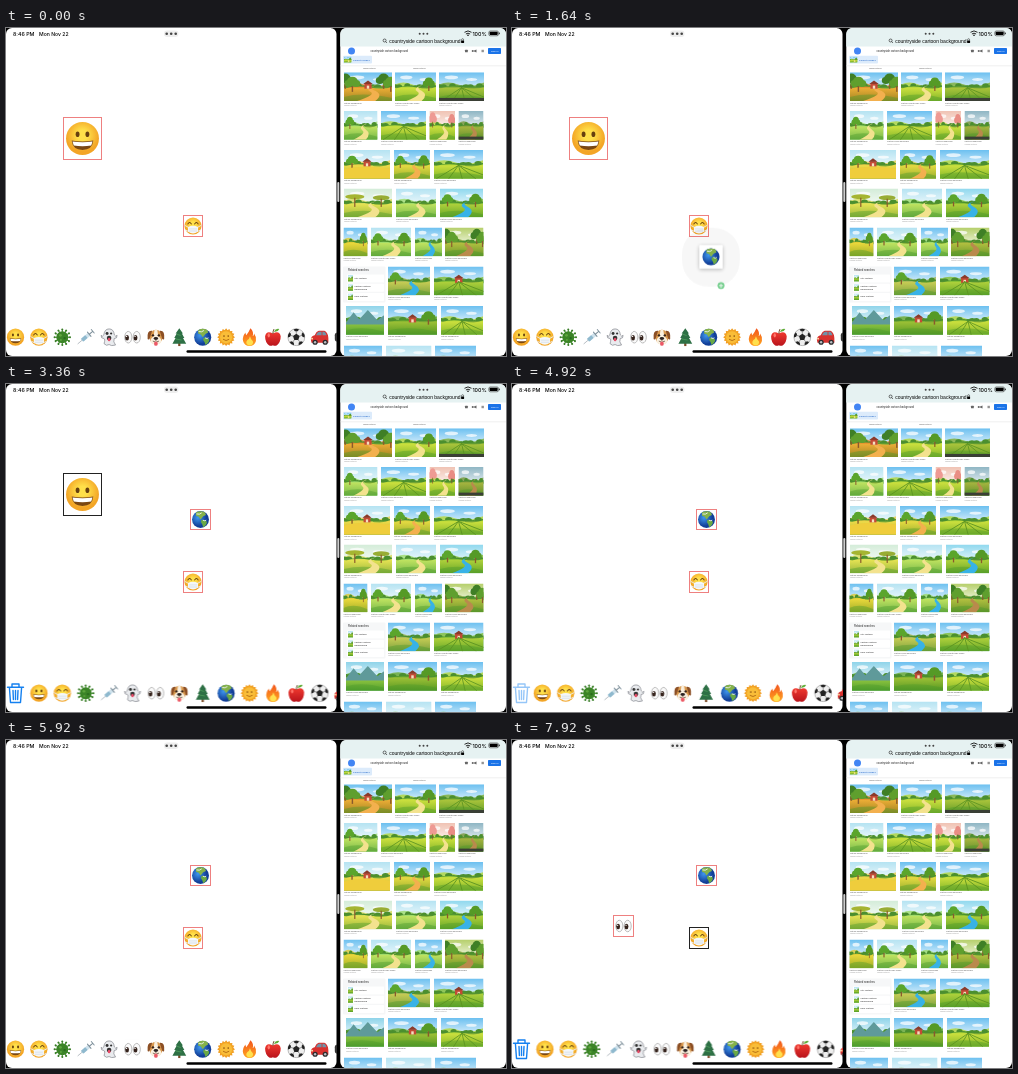
Write an HTML page that moves like this. It is 500x328 px and loops after 8 s.

```html
<!DOCTYPE html>
<html lang="en">
<head>
<meta charset="utf-8">
<title>Emoji board</title>
<style>
html, body { margin: 0; width: 100%; height: 100%; overflow: hidden; background: #000; }
svg { display: block; }
#stage { width: 100vw; height: 100vh; }
text { font-family: "Liberation Sans", sans-serif; }
.status { font-family: Inter, sans-serif; font-size: 5.3px; font-weight: 500; }
.card { filter: drop-shadow(0 1px 2px #0004); }
</style>
</head>
<body>
<svg id="stage" viewBox="0 0 500 328">
  <defs>
    <radialGradient id="gold" cy=".4"><stop offset=".3" stop-color="#ffe04a"/><stop offset="1" stop-color="#f3a526"/></radialGradient>
    <radialGradient id="sea" cx=".35" cy=".4"><stop offset="0" stop-color="#3f97ee"/><stop offset="1" stop-color="#123f98"/></radialGradient>
    <linearGradient id="flame" x2="0" y2="1"><stop offset="0" stop-color="#f2541d"/><stop offset="1" stop-color="#ffa51f"/></linearGradient>
    <linearGradient id="skin" x2="0" y2="1"><stop offset="0" stop-color="#f0392f"/><stop offset="1" stop-color="#b9141c"/></linearGradient>
    <linearGradient id="haze" x2="0" y2="1"><stop offset="0" stop-color="#fff" stop-opacity="0"/><stop offset="1" stop-color="#fff" stop-opacity=".65"/></linearGradient>
    <linearGradient id="shade" x2="0" y2="1"><stop offset="0" stop-color="#fff04a" stop-opacity=".35"/><stop offset="1" stop-color="#2c7a12" stop-opacity=".4"/></linearGradient>
    <clipPath id="leftClip"><rect width="330.5" height="328" rx="6"/></clipPath>
    <clipPath id="rightClip"><rect x="334.3" width="165.7" height="328" rx="6"/></clipPath>
  </defs>
  <g clip-path="url(#leftClip)">
    <rect width="331" height="328" fill="#fff"/>
    <text class="status" x="7" y="7.5">8:46 PM</text>
    <text class="status" x="33" y="7.5" style="font-size:5.1px">Mon Nov 22</text>
    <rect x="158" y="2.5" width="14.5" height="6.5" rx="3.2" fill="#eee"/>
    <g id="leftDots" fill="#444"></g>
    <g id="board"></g>
    <g id="trash" fill="none" stroke="#1480f0" stroke-width="1.4" stroke-linecap="round" stroke-linejoin="round">
      <path d="M1.5 303.2H17.5M6 303V300H13V303M3.4 303.5L4.5 318.5H14.5L15.6 303.5M7 306.5L7.4 315.5M9.5 306.5V315.5M12 306.5L11.6 315.5"/>
    </g>
    <g id="tray"></g>
    <rect x="180.5" y="322.3" width="140" height="2.5" rx="1.2"/>
    <g id="drags"></g>
  </g>
  <rect x="331.3" y="154" width="2" height="20" rx="1" fill="#ccc"/>
  <g clip-path="url(#rightClip)">
    <rect x="334" width="166" height="328" fill="#fff"/>
    <rect x="334" width="166" height="18.5" fill="#e6f2f2"/>
    <g id="rightDots" fill="#444"></g>
    <g fill="none" stroke="#111" stroke-width=".9">
      <path d="M458.5 4.3Q462 1.5 465.5 4.3M459.9 6Q462 4.3 464.1 6"/>
      <circle cx="378.6" cy="12.5" r="1.5" stroke-width=".6"/><path d="M379.7 13.6L381 15" stroke-width=".6"/>
      <path d="M455.6 12.7V11.7A1 1 0 0 1 457.6 11.7V12.7" stroke-width=".5"/>
      <rect x="482.8" y="3" width="9.7" height="4.8" rx="1.5" stroke-width=".5"/>
    </g>
    <circle cx="462" cy="7.3" r=".8"/>
    <rect x="483.6" y="3.8" width="8.1" height="3.2" rx=".8"/><rect x="493" y="4.6" width=".7" height="1.6"/>
    <rect x="455.1" y="12.6" width="3" height="2.4" rx=".4"/>
    <text class="status" x="466.4" y="7.5">100%</text>
    <text x="383.3" y="14.8" font-size="5">countryside cartoon background</text>
    <circle cx="345.5" cy="23" r="3.5" fill="#4285f4"/>
    <text x="364.5" y="24" font-size="2.65" fill="#222">countryside cartoon background</text>
    <g fill="#666"><rect x="459" y="21.8" width="2.8" height="2.4" rx=".5"/><circle cx="466.7" cy="23" r="1"/><path d="M467 23L470.5 21.5V24.5Z"/><rect x="475.5" y="21.8" width="2.4" height="2.4" opacity=".7"/></g>
    <rect x="482" y="20" width="13" height="6" rx=".8" fill="#1a73e8"/>
    <text x="488.5" y="23.9" font-size="2.5" fill="#fff" text-anchor="middle">Sign in</text>
    <rect x="337" y="27.8" width="29" height="7.6" rx="1" fill="#dcebfb"/>
    <text x="347" y="32.5" font-size="2.5" fill="#1a62c8">Perfect image?</text>
    <path d="M334 37.8H500" stroke="#e4e4e4" stroke-width=".6"/>
    <g id="results"></g>
  </g>
</svg>
<script>
const LOOP = 8000, STEP = 23.4, TRAY_Y = 309.2;
const RED = '#ee8080', BLACK = '#222';
const $ = id => document.getElementById(id);
const add = (id, markup) => $(id).insertAdjacentHTML('beforeend', markup);
const circle = (x, y, r, fill) => `<circle cx="${x}" cy="${y}" r="${r}" fill="${fill}"/>`;
const oval = (x, y, rx, ry, fill) => `<ellipse cx="${x}" cy="${y}" rx="${rx}" ry="${ry}" fill="${fill}"/>`;
const rect = (x, y, w, h, fill, rx = 0) => `<rect x="${x}" y="${y}" width="${w}" height="${h}" rx="${rx}" fill="${fill}"/>`;
const shape = (d, fill) => `<path d="${d}" fill="${fill}"/>`;
const line = (d, stroke, width = 1) => `<path d="${d}" fill="none" stroke="${stroke}" stroke-width="${width}" stroke-linecap="round"/>`;
const mirror = draw => [-1, 1].map(draw).join('');
const spokes = (n, draw) => Array.from({ length: n }, (_, i) => `<g transform="rotate(${i * 360 / n})">${draw}</g>`).join('');

// Emoji, drawn in a 20 x 20 box around the origin
const face = circle(0, 0, 9.4, 'url(#gold)');
const EMOJI = {
  smile: face + mirror(s => oval(s * 2.8, -2.4, 1.1, 1.6, '#67400f')) +
    shape('M-6.2 1.2Q0 2.2 6.2 1.2Q5.6 6.6 0 6.6Q-5.6 6.6 -6.2 1.2Z', '#7a4712') +
    shape('M-5.7 1.7Q0 2.6 5.7 1.7L5 4Q0 4.9 -5 4Z', '#fff'),
  mask: face + mirror(s => line(`M${s * 5.7} -2.3Q${s * 3.7} -5.5 ${s * 1.8} -2.3`, '#67400f', 1.1) +
    line(`M${s * 5} 1.5L${s * 8.7} -.5M${s * 5} 6L${s * 8} 4.5`, '#e8edf2')) +
    shape('M-5.5 1Q0 -1.5 5.5 1V6Q0 10.5 -5.5 6Z', '#f4f7fa') + line('M-4 3.2H4M-4 5.5H4', '#c6d1da', .6),
  virus: spokes(12, line('M0 -5V-8.3', '#3f8b2b', 1.1) + circle(0, -8.4, 1.1, '#397d27')) +
    circle(0, 0, 6.5, '#3b8427') + circle(-2, -2, 1.5, '#5ea63e') + circle(2.5, 1, 1.3, '#286a1d') + circle(-1.5, 3, 1, '#5ea63e'),
  syringe: `<g transform="rotate(50)">${line('M0 5V11', '#87939c', .6) + rect(-2, -5, 4, 10.5, '#cfe2ec', .8) +
    rect(-2, -1, 4, 6, '#8fb9ce', .6) + line('M0 -5V-10M-2.5 -10H2.5M-3 -5H3', '#7e909b', 1.1)}</g>`,
  ghost: `<g stroke="#777b82" stroke-width=".7">${shape('M-5.5 7Q-4 2 -5.5 1.5Q-9 1.5 -8.7 -2Q-7 0 -5.7 -2.5Q-5 -9 0 -9T5.7 -2.5Q7 0 8.7 -2Q9 1.5 5.5 1.5Q4 5 7 8.5Q2 10 0 8Q-3 10 -5.5 7Z', '#e9ebee')}</g>` +
    circle(-2.2, -4, 1.6, '#333') + circle(2.2, -4, 1.2, '#333') + oval(0, 1, 2.5, 2.7, '#333') + oval(0, 2.5, 1.5, 2, '#e74c68'),
  eyes: mirror(s => `<g stroke="#999" stroke-width=".7">${oval(s * 4.6, 0, 3.9, 6.3, '#fafafa')}</g>` +
    oval(s * 4.6 - 1.3, .5, 2.1, 3, '#35231c') + circle(s * 4.6 - 1.8, -.8, .7, '#fff')),
  dog: oval(0, 0, 7, 8, '#d9994e') + mirror(s => shape(`M${s * 4} -7Q${s * 10} -8 ${s * 9} 2Q${s * 7} 4 ${s * 6} -1Z`, '#8c4f24')) +
    shape('M-1.5 -8H1.5L2.5 -1Q7 2 5.5 6Q0 10 -5.5 6Q-7 2 -2.5 -1Z', '#faf0df') + oval(0, 7, 2, 2.4, '#ec5866') +
    mirror(s => circle(s * 3.2, -2, 1.3, '#352319')) + oval(0, 1.5, 2.4, 1.6, '#2b2220') + line('M-3 4.5Q-1 6 0 3.5Q1 6 3 4.5', '#49301f', .7),
  tree: rect(-1.2, 6, 2.4, 3.7, '#7a4a26') + shape('M0 -9.7L4 -4H2.8L5.5 1H4L7.5 7H-7.5L-4 1H-5.5L-2.8 -4H-4Z', '#2e7045') +
    line('M-2 -3L1 -2M-3.5 2L2 3', '#53a45e', .8),
  globe: circle(0, 0, 9.3, 'url(#sea)') + shape('M-5 -7.6Q0 -10.4 5 -7.8L6 -5 3 -3.5 1 -1 0 0 -2 -3 -5 -4Z', '#85b24a') +
    shape('M1 .5Q4 -.5 7 2.5Q7.5 4 5.5 6.5L3 8.5Q2.5 5 .5 3Z', '#6aa945') + line('M-4 -6Q-1 -5 1 -7M3 1Q5 2 6 1', '#eef4f5', 1),
  sun: spokes(16, shape('M-2 -7L0 -9.7 2 -7Z', '#ef9a1f')) + circle(0, 0, 8, '#f3a425') + circle(0, 0, 6.5, '#f9bd38') +
    mirror(s => circle(s * 2.3, -1.2, .9, '#8a510e')) + line('M-3 2.5Q0 5 3 2.5', '#a9610f', .9),
  fire: shape('M1 -9.7Q-1 -5 -3.5 -2Q-4.5 -4 -4.3 -5Q-8 -1 -7 4Q-5.5 9.5 0 9.5T7 4Q8 0 5 -4Q5 -1.5 3.5 -1Q5 -6 1 -9.7Z', 'url(#flame)') +
    shape('M.5 -1Q0 2 -2.3 3Q-4.5 5.5 -2.5 8Q0 10 3 8Q5 5 2.5 3Q1.5 2 .5 -1Z', '#ffe04e'),
  apple: shape('M0 -4Q7 -8 8.5 -1Q8.5 6 4 9Q2 9.8 0 8.8Q-2 9.8 -4 9Q-8.5 6 -8.5 -1Q-7 -8 0 -4Z', 'url(#skin)') +
    line('M0 -4Q0 -7 1 -8.5', '#63401f', 1) + shape('M1 -6Q3 -10 7 -9Q5 -5 1 -6Z', '#5eac36') + oval(-4.5, -2, 1.3, 2.2, '#ff756a'),
  ball: `<g stroke="#888" stroke-width=".6">${circle(0, 0, 9.2, '#eee')}</g>` + shape('M0 -3.8L3.6 -1.2 2.2 3H-2.2L-3.6 -1.2Z', '#222') +
    spokes(5, line('M0 -4V-7', '#555', .6) + shape('M-3 -8.5Q0 -10 3 -8.5L1.5 -6.5H-1.5Z', '#222')),
  car: shape('M-9.7 2Q-9 -1.5 -5.5 -2.2Q-3.5 -6.5 -1 -7H5Q7.5 -6.5 9 -2Q9.8 1 9.5 6H-9Z', '#d8322f') +
    shape('M-4 -2.2Q-2.5 -5.6 -.8 -5.8H2V-2Z', '#6f93a8') + shape('M3 -5.8H5Q6.6 -5 7.4 -2H3Z', '#6f93a8') +
    [-5, 6].map(x => circle(x, 5.5, 2.8, '#2b2b2d') + circle(x, 5.5, 1.3, '#b9bdc2')).join('') + circle(-8.3, 1.6, 1, '#ffeab0'),
  taxi: rect(-9, -5, 18, 10, '#333', 3)
};
for (const [name, art] of Object.entries(EMOJI))
  document.querySelector('defs').insertAdjacentHTML('beforeend', `<symbol id="${name}" viewBox="-10 -10 20 20">${art}</symbol>`);
const emoji = (name, x, y, size) => `<use href="#${name}" x="${x - size / 2}" y="${y - size / 2}" width="${size}" height="${size}"/>`;

// Left side: tray and placed items
add('leftDots', [160.7, 165.2, 169.7].map(x => circle(x, 5.7, 1.3)).join(''));
add('rightDots', [413.7, 417.5, 421.3].map(x => circle(x, 5.7, 1)).join(''));
Object.keys(EMOJI).forEach((name, i) => add('tray', emoji(name, 9.5 + i * STEP, TRAY_Y, 18.4)));

function place(name, x, y, w, h, size) {
  add('board', `<g id="${name}Item"><rect id="${name}Box" x="${x}" y="${y}" width="${w}" height="${h}" fill="none" stroke="${RED}"/>
    ${emoji(name, x + w / 2, y + h / 2, size)}</g>`);
}
place('smile', 57.5, 89.5, 38, 42, 35);
place('mask', 177.5, 187.5, 19, 21, 18.2);
place('globe', 184.5, 125.5, 20, 20, 18.2);
place('eyes', 101.5, 175.5, 20, 21, 18.2);

// Right side: image results
const road = color => shape('M25 13Q17 16 22 19T11 28H26Q33 22 26 18T27 13Z', color);
const tree = (x, y, r, color) => rect(x - .6, y, 1.2, r * 1.8, '#8a5a2c') + circle(x - r * .7, y, r * .75, color) +
  circle(x + r * .7, y, r * .75, color) + circle(x, y - r * .5, r, color);
const PARTS = {
  m: shape('M0 16L8 6 14 13 23 4 33 14 40 9V18H0Z', '#5f9a9a'),
  y: shape('M0 19Q14 14 40 18V28H0Z', '#efcd3c'),
  f: line('M20 15L2 28M20 15L12 28M20 15L23 28M20 15L34 28M20 15L46 27', '#5c9422', .8),
  p: road('#f3e28e'), o: road('#f3b04e'), r: road('#38b2e6'), b: road('#b98a4c'),
  F: [1, 7, 33, 39].map((x, i) => tree(x, 8 + i % 2 * 3, 4.5, i % 2 ? '#5f9f2e' : '#3f7f26')).join(''),
  t: tree(7, 11, 3.6, '#5aa52c'), T: tree(33, 11, 4, '#559a26'),
  a: oval(9, 8, 8, 2.5, '#a5b531') + rect(8.5, 9, 1, 9, '#8a5a2c') + oval(31, 9, 7, 2.5, '#98ad34') + rect(30.5, 10, 1, 8, '#8a5a2c'),
  k: tree(5, 8, 4.5, '#ee9a93') + tree(35, 9, 4, '#e98d84'),
  h: rect(17, 11, 6, 5, '#c44a35') + shape('M16 11.5L20 8 24 11.5Z', '#8b3a2a') + rect(19, 13, 2, 3, '#f4dfc0'),
  d: rect(0, 25, 40, 3, '#3a3f35')
};
const bushes = Array.from({ length: 11 }, (_, i) => oval(i * 4, 13.5 + i % 3, 3, 1.8 + i % 2, '#4b8f2f')).join('');
const scene = (x, y, w, h, sky, grass, parts) => `<svg x="${x}" y="${y}" width="${w}" height="${h}" viewBox="0 0 40 28" preserveAspectRatio="none">
  ${rect(0, 0, 40, 28, sky)}${rect(0, 0, 40, 14, 'url(#haze)')}${oval(11, 5, 6, 1.8, '#fffb')}${oval(29, 7, 5, 1.5, '#fffb')}
  <g opacity=".8">${shape('M0 12Q8 8 17 12T40 10V28H0Z', grass)}</g>${bushes}${shape('M0 16Q10 12.5 22 15T40 14V28H0Z', grass)}
  ${rect(0, 15, 40, 13, 'url(#shade)')}${shape('M0 24Q16 19 40 25V28H0Z', '#4b982c66')}${[...parts].map(p => PARTS[p]).join('')}</svg>`;

const BLUE = '#6cc0f0', PALE = '#b5e3f2', LIME = '#b2d838', GREEN = '#84c034', MINT = '#9edc6c';
const ROWS = [
  [44.3, [338, 48, BLUE, '#e58a2c', 'Foh'], [389, 41, BLUE, LIME, 'pT'], [433, 45, BLUE, '#7fae34', 'fd']],
  [83, [338, 33.5, PALE, MINT, 'tp'], [375, 45, BLUE, LIME, 'f'], [423.5, 25.5, '#f0c3b4', LIME, 'kp'], [452.5, 25, '#8fb6c4', '#78963a', 'bd']],
  [122, [338, 46, PALE, '#e8cf48', 'thy'], [388, 36, BLUE, '#d8cf3e', 'tTo'], [428, 49, BLUE, LIME, 'f']],
  [160.5, [338, 48, '#d3ecd8', '#d8dc58', 'ap'], [390, 40, PALE, MINT, 'p'], [434, 43, '#8fd8ee', GREEN, 'trT']],
  [199.5, [337.5, 24, BLUE, '#e0cc34', 'T'], [365, 40, PALE, MINT, 'ptT'], [409, 27, BLUE, MINT, 'r'], [439, 38.5, '#b5cf6a', '#8aa63a', 'Fb']],
  [238.5, [382, 42, BLUE, '#a9b95a', 'tr'], [428, 49.5, BLUE, GREEN, 'hf']],
  [278, [340, 38, '#8fd4ea', '#62b53e', 'm'], [382, 49, BLUE, '#6aa82c', 'hT'], [435, 42, BLUE, LIME, 'f']],
  [317.5, [338, 38, BLUE, GREEN, ''], [380, 45.5, PALE, GREEN, ''], [429, 41, BLUE, GREEN, '']]
];
const label = (x, y, text, size = 2.05, fill = '#555') => `<text x="${x}" y="${y}" font-size="${size}" fill="${fill}">${text}</text>`;
const TITLES = ['Cartoon countryside scene', 'Cartoon rural landscape', 'Nature background'];
for (const [y, ...images] of ROWS) {
  images.forEach(([x, w, ...look], i) => {
    add('results', scene(x, y, w, 28.7, ...look) +
      label(x, y + 31.2, w < 30 ? 'Cartoon landscape' : TITLES[Math.floor(i + x) % 3]) + label(x, y + 33.7, 'sample pictures', 1.8, '#999'));
  });
}
add('results', label(357, 40.8, 'sample pictures', 1.8) + label(407, 40.8, 'sample pictures', 1.8) +
  scene(338, 28.6, 7.5, 6, BLUE, LIME, 'Tp') + rect(337, 238.5, 42.5, 36, '#f6f7f8', 1) + label(342, 243.3, 'Related searches', 2.7, '#222') +
  [['city cartoon'], ['cartoon natural', 'background'], ['farm cartoon']].map((lines, i) => {
    const y = 247 + i * 9.2;
    return rect(341, y - .5, 37, 8, '#fff', .6) + scene(342, y, 5, 6.5, PALE, GREEN, 'T') +
      lines.map((text, n) => label(348.5, y + 4 - (lines.length - 1) * 1.3 + n * 2.7, text, 2.4, '#222')).join('');
  }).join(''));

// Motion: each track is a short table of [ms, value]
function play(id, prop, steps, easing = 'linear') {
  const track = [...steps, [LOOP, steps.at(-1)[1]]];
  $(id).animate(track.map(([ms, value]) => ({ offset: ms / LOOP, [prop]: value, easing })), { duration: LOOP, iterations: Infinity });
}
const hold = (id, prop, steps) => play(id, prop, steps, 'step-end');
const at = (x, y, scale = 1) => `translate(${x}px, ${y}px) scale(${scale})`;

function drag(name, start, badgeStart, drop, path) {
  const id = part => name + part;
  const end = path.at(-1)[0];
  add('drags', `<g id="${id('Drag')}"><g id="${id('Lift')}">
    <g id="${id('Halo')}">${rect(-29, -29, 58, 59, '#00000008', 26)}</g>
    <g class="card">${rect(-11.7, -11.7, 23.4, 23.4, '#fff', .5)}</g>${emoji(name, 0, 0, 18.4)}</g>
    <g id="${id('Badge')}">${circle(0, 0, 5.6, '#36b95a') + line('M-2.7 0H2.7M0 -2.7V2.7', '#fff', 1.1)}</g></g>`);
  play(id('Drag'), 'transform', [[0, at(...path[0].slice(1))], ...path.map(([ms, x, y]) => [ms, at(x, y)])]);
  play(id('Drag'), 'opacity', [[0, 0], [start, 0], [start + 80, 1], [end - 80, 1], [end, 0]]);
  play(id('Lift'), 'transform', [[0, at(0, 0, .8)], [start, at(0, 0, .8)], [start + 200, at(0, 0)], [drop, at(0, 0)], [end, at(0, 0, .85)]]);
  play(id('Halo'), 'opacity', [[0, 0], [start + 80, 0], [start + 280, 1], [drop, 1], [end - 80, 0]]);
  play(id('Badge'), 'transform', [[0, at(10, 33, .5)], [badgeStart, at(10, 33, .5)], [badgeStart + 40, at(10, 29, .65)],
    [badgeStart + 240, at(11.5, -9.5)], [drop, at(11.5, -9.5)], [drop + 120, at(11.5, -9.5, .3)]]);
  play(id('Badge'), 'opacity', [[0, 0], [badgeStart, 0], [badgeStart + 40, .65], [badgeStart + 200, 1], [drop, 1], [drop + 120, 0]]);
  hold(id('Item'), 'opacity', [[0, 0], [end - 80, 1]]);
}
drag('globe', 1200, 1600, 2440, [[1440, 197, 309], [1560, 198, 262], [1640, 199, 229], [1840, 196, 180], [2080, 193, 150], [2360, 191, 138], [2760, 194.5, 135.5]]);
drag('eyes', 5920, 6320, 7120, [[6160, 126, 309], [6320, 117, 247], [6480, 105, 201], [6640, 101, 190], [7120, 102, 189], [7440, 111.5, 186]]);

hold('smileBox', 'stroke', [[0, RED], [3280, BLACK]]);
hold('maskBox', 'stroke', [[0, RED], [7920, BLACK]]);
hold('smileItem', 'opacity', [[0, 1], [4800, 0]]);

const slide = x => at(x, 0);
play('tray', 'transform', [[0, slide(0)], [3280, slide(0)], [3280, slide(STEP)], [4840, slide(STEP)], [4920, slide(20.9)],
  [5040, slide(9)], [5120, slide(3)], [5200, slide(0)], [7920, slide(0)], [7920, slide(STEP)]]);
play('trash', 'opacity', [[0, 0], [3280, 0], [3280, 1], [4640, 1], [4720, .45], [4920, .45], [5120, 0], [7920, 0], [7920, 1]]);
</script>
</body>
</html>
```
